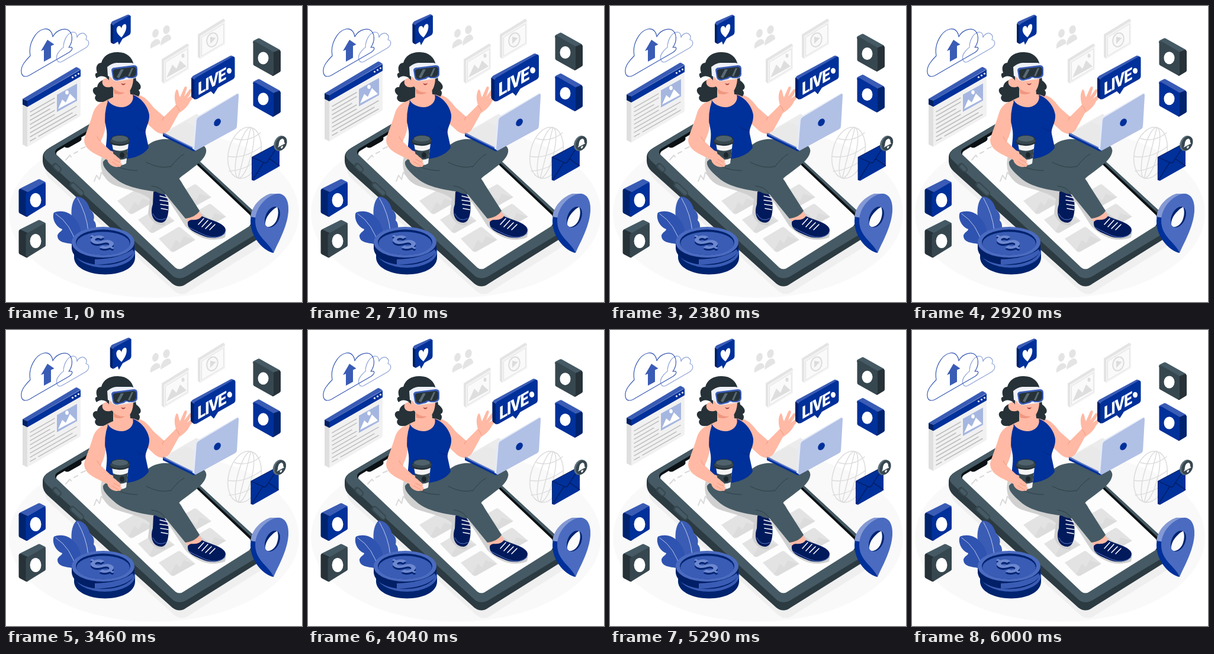
Recreate the animation shown at these times as an HTML page. Size 500x500 px, loop 6040 ms.

```html
<!DOCTYPE html>
<html lang="en">
<head>
<meta charset="utf-8">
<title>Live from the phone</title>
<style>
html, body { margin: 0; height: 100%; overflow: hidden; background: #fff; }
svg { display: block; width: 100vw; height: 100vh; }
.blue { --front: #00309a; --side: #00236f; --top: #3a5cb5; }
.dark { --front: #37474f; --side: #263238; --top: #455a64; }
.front { fill: var(--front); stroke: var(--front); }
.side { fill: var(--side); stroke: var(--side); }
.top { fill: var(--top); stroke: var(--top); }
.front, .side, .top { stroke-width: 6; stroke-linejoin: round; }
.line { fill: none; stroke-linecap: round; stroke-linejoin: round; }
.skin { fill: #ffb9a4; }
.ink { fill: #263238; }
.shoe { fill: #001a5c; }
</style>
</head>
<body>
<svg viewBox="0 0 500 500">
<defs>
  <!-- block facing left, and block facing right -->
  <g id="blockL">
    <path class="top" d="M420 61L427 57.500 460 76 451 80Z"/>
    <path class="side" d="M450 82L461 77.500V109L451 115Z"/>
    <path class="front" d="M420.500 63L449 79.500V114L420.500 98Z"/>
    <ellipse cx="434.500" cy="88" rx="9" ry="10.500" fill="#fff"/>
  </g>
  <g id="blockR">
    <path class="top" d="M25 311L56 295.500 64 299.500 35 315Z"/>
    <path class="side" d="M24.500 312L35 317V353L24.500 347.500Z"/>
    <path class="front" d="M36.500 318L64 302V335L36.500 352Z"/>
    <ellipse cx="50" cy="328" rx="9.500" ry="12" fill="#fff"/>
  </g>
  <g id="tile">
    <path d="M188 329L220 310Q223 308 226 311L250 331 214 351Q211 353 208 350Z" fill="#e3e3e3"/>
    <path d="M207 349L217 331 224 337 230 325 249 331 214 351Z" fill="#dcdcdc"/>
  </g>
  <g id="frame">
    <path d="M263 90L306 63.500 309 66V106L267 131 263 128Z" fill="#e4e4e4"/>
    <path d="M267 92.500L309 67V106L267 131Z" fill="#f3f3f3"/>
    <path d="M269.500 95L306.500 72.500V104.500L269.500 126.500Z" fill="#fafafa" stroke="#e3e3e3"/>
  </g>
  <path id="body" d="M62 262V255Q62 246 74 239L213 157 439 366Q443 381 428 392L305 469Q293 478 281 469L70 279Q62 271 62 262Z"/>
</defs>

<ellipse cx="250" cy="350" rx="245" ry="143" fill="#f9f9f9"/>

<!-- clouds -->
<g class="line" stroke-width="1.200">
  <path stroke="#8fa3d6" d="M91 95C84 94 84 84 89 78 92 74 95 71 97 70 97 58 104 45 113 44 118 44 120 48 120 53 123 46 130 44 134 48 137 51 136 55 135 57 141 58 142 66 134 71L96 93Q93 95 91 95Z"/>
  <path stroke="#3a5cb5" d="M33 119C24 119 24 106 30 97 34 91 38 87 41 84 37 64 50 42 64 39 73 37 78 44 79 52 84 42 96 37 104 40 113 45 114 59 106 70 113 68 114 73 107 78L43 115Q37 119 33 119Z"/>
</g>
<path d="M70 57L59 76 64 74V94L76 87.500V67.500L81.500 65Z" fill="#3a5cb5"/>

<!-- grey wall icons -->
<g fill="#e4e4e4">
  <ellipse cx="252.500" cy="46" rx="5.200" ry="7.500" transform="rotate(18 252 46)"/>
  <path d="M244 72C242 63 249 57 254 56Q260 55 261 63Z"/>
  <ellipse cx="271" cy="40" rx="5.500" ry="7.500" transform="rotate(18 271 40)"/>
  <path d="M261 67L262 59Q265 50 273 48 279 48 279 56Z"/>
</g>
<use href="#frame"/>
<path d="M271 121L281 99 288 106 294 92 305 102Z" fill="#dedede"/>
<ellipse cx="299" cy="84" rx="2.500" ry="3.500" fill="#dedede"/>
<use href="#frame" x="61" y="-42"/>
<ellipse cx="348.500" cy="57" rx="9" ry="12" transform="rotate(18 348 57)" fill="#f8f8f8" stroke="#dcdcdc" stroke-width="2"/>
<path d="M345 52L354.500 54 345 64Z" fill="#dcdcdc"/>

<!-- globe -->
<g class="line" stroke="#dcdcdc" stroke-width="1.500">
  <g transform="rotate(14 403 248)">
    <ellipse cx="403" cy="248" rx="27" ry="44"/>
    <ellipse cx="403" cy="248" rx="12" ry="44"/>
    <path d="M403 204V292"/>
  </g>
  <path d="M386 224Q409 231 430 214M375 254Q403 259 432 237M377 279Q399 278 420 264"/>
</g>

<!-- browser window -->
<g id="browser">
  <path d="M28 166L36 170V238L28 234Z" fill="#dfdfdf"/>
  <path d="M36 170L126 118.500V184Q126 186 124 187L36 238Z" fill="#f1f1f1"/>
  <path d="M28 157L117 104Q119 102.500 121 104L126 107 36 160Z" fill="#3a5cb5"/>
  <path d="M28 157L36 160V170.500L28 166.500Z" fill="#001f66"/>
  <path d="M36 160L126 107.500V119L36 170.500Z" fill="#00309a"/>
  <g fill="#fff"><circle cx="112.500" cy="120.500" r="1.600"/><circle cx="117.500" cy="117.500" r="1.600"/><circle cx="122.500" cy="114.500" r="1.600"/></g>
  <path d="M86 150L120 131V160L86 179Z" fill="#a5b6e0"/>
  <path d="M88 174L95 158 101 163 108 148 118 158Z" fill="#fff"/>
  <ellipse cx="103" cy="146" rx="2.800" ry="3.500" fill="#fff"/>
  <path class="line" stroke="#bdbdbd" stroke-width="1.500" d="M41 179L82 155.500M41 186L82 162.500M41 193L74 174M41 200L82 176.500M41 207L82 183.500M41 214L119 169.500M41 221L112 180.500M55 220L119 183.500M41 228L50 223"/>
</g>

<!-- phone -->
<use href="#body" fill="#efefef" x="4" y="13"/>
<use href="#body" fill="#2c3a41"/>
<path fill="#455a64" d="M64 252Q64 245 75 239L213 157 437 364Q441 375 428 382L304 457Q293 463 283 457L71 263Q64 257 64 252Z"/>
<path class="line" stroke="#37474f" stroke-width="10" d="M83 270L89 276M112 302L127 316"/>
<path class="line" stroke="#455a64" stroke-width="6" d="M84 271L89 276M113 303L127 316"/>
<path d="M84 250Q81 244 88 240L217 164 418 353Q424 361 414 370L300 442Q293 447 286 442Z" fill="#0b1114"/>
<path d="M85 251Q84 247 89 244L99 238Q103 241 108 238L124 229Q129 226 127 222L218 169.500 412 353Q418 364 411 372L300 442Q293 447 286 442Z" fill="#fdfdfd"/>
<g class="line" stroke="#dadada" stroke-width="2">
  <path d="M149 296L153 286 158 293 161 281 168 288"/>
  <path d="M101 260L108 252 110 255M115 249L121 246M127 241L134 238"/>
</g>
<use href="#tile"/>
<use href="#tile" x="35" y="32"/>
<use href="#tile" x="70" y="64"/>
<use href="#tile" x="97" y="-8"/>
<use href="#tile" x="122" y="25"/>
<path d="M277 208L322 182 345 200 300 225Z" fill="#ececec"/>
<path d="M163 250C155 275 165 298 190 305 212 312 232 316 243 326L240 350Q248 372 268 370L276 330 303 372Q335 404 370 391L372 380 330 350 295 300Z" fill="#d0d0d0"/>

<!-- leaves -->
<path d="M126 402C109 372 105 336 119 322 132 322 139 333 142 344 150 350 149 358 148 362 154 368 152 376 151 382Z" fill="#3a5cb5"/>
<path d="M112 402C102 400 86 400 87 387 90 381 95 380 95 377 83 373 77 357 81 349 92 344 108 347 117 360 128 371 128 391 128 405Z" fill="#2f53b0"/>
<path class="line" stroke="#dbe2f3" stroke-width=".8" d="M84 351Q110 368 119 404M121 325Q136 351 139 380"/>

<!-- coins -->
<path d="M115 410V426C119 462 215 463 218 426V410Z" fill="#00236f"/>
<ellipse cx="167" cy="415" rx="51" ry="27" fill="#3a5cb5"/>
<path d="M111 400V410C115 447 213 446 217 410V400Z" fill="#001f66"/>
<path d="M150 437V428Q192 427 214 411L216 416Q202 436 150 437Z" fill="#3a5cb5"/>
<ellipse cx="164" cy="399" rx="53" ry="26" fill="#4a6bc0"/>
<ellipse cx="164" cy="399" rx="46" ry="21.500" fill="#00236f"/>
<ellipse cx="164" cy="401" rx="45" ry="19.500" fill="#3a5cb5"/>
<g font-family="Roboto, Arial, sans-serif" font-size="48" font-weight="700" text-anchor="middle">
  <text transform="matrix(.85 -.49 .85 .49 162 402)" y="17" fill="#00236f">$</text>
  <text transform="matrix(.85 -.49 .85 .49 162 399)" y="17" fill="#6d88d0">$</text>
</g>

<!-- far leg and shoe -->
<path class="shoe" d="M249 314C258 308 272 317 274 332 276 347 273 365 263 366 247 366 243 349 248 335Z"/>
<path class="line" stroke="#fff" stroke-width="1.500" d="M260 321L272 324M260 328L274 330M261 335L274 337M262 342L273 344"/>
<path class="line" stroke="#5b78c4" d="M248 351Q255 366 270 359"/>
<path d="M228 248C246 220 275 222 296 230 325 226 341 236 338 247 335 262 314 274 294 290L272 318Q260 319 251 312L274 278Z" fill="#455a64"/>

<!-- right arm and hand -->
<path class="skin" d="M217 149C235 150 243 164 250 172L267 187 287 167C284 157 284 148 288 141 292 140 291 150 294 154L301 138C304 134 307 137 305 141L301 153 310 141C315 139 314 145 309 152L305 157 313 151C318 152 316 156 311 161 306 172 299 176 292 181L276 210Q265 221 252 211L229 190Z"/>
<path class="line" stroke="#ef9780" d="M287 168Q291 171 293 177M267 187L264 193"/>

<!-- laptop -->
<path d="M268 215L303 196 321 204 318 241Z" fill="#e9e9e9"/>
<path d="M265 215L318 241 388 201V206L319 245Q317 246 314 244L265 220Z" fill="#00309a"/>
<path d="M265 215L318 241" stroke="#5c7acb" stroke-width="2"/>
<path d="M315 241L319 192Q319 189 322 187L389 148Q393 146 393 150L390 203Q390 206 387 208L320 244Z" fill="#e6ebf7"/>
<path d="M318 242L322 193Q322 190 325 188L390 149Q393 147 393 151L390 203Q390 206 387 208L321 244Q318 245 318 242Z" fill="#b1c0e5"/>
<ellipse cx="357.500" cy="196.500" rx="5" ry="7" transform="rotate(38 357 196)" fill="#00309a"/>

<!-- near leg and shoe -->
<path class="skin" d="M300 347L325 344 332 357 309 372Z"/>
<path fill="#455a64" d="M164 263C175 249 212 247 237 236 265 249 266 265 275 275 284 283 293 290 299 302L327 346C322 354 312 358 303 359L268 316C246 312 205 310 183 290 168 277 163 270 164 263Z"/>
<path class="line" stroke="#2f3f47" d="M237 264Q260 276 278 271M190 272Q205 278 222 278M268 316Q262 306 246 304M278 272Q291 255 301 250"/>
<path class="shoe" d="M307 365C312 357 323 366 331 355 342 361 370 366 371 378 370 393 346 395 330 387 316 381 306 377 307 365Z"/>
<path class="line" stroke="#fff" stroke-width="1.600" d="M325 369L334 359M331 373L341 362M337 376L347 366M344 378L353 369"/>
<path class="line" stroke="#5b78c4" d="M309 374Q326 383 338 388 358 395 370 384"/>

<!-- hair, torso, head -->
<path class="ink" d="M171 122C163 117 158 118 153 122 149 116 151 113 154 113 150 102 155 96 161 96 164 84 175 78 187 78 203 77 213 86 216 99L220 126C230 133 229 140 224 142 230 149 222 158 212 155 202 162 188 158 183 151 182 163 169 166 162 162 153 164 147 156 152 151 143 144 147 136 154 137 155 128 163 125 171 122Z"/>
<path class="skin" d="M181 138L209 138 210 149Q224 150 232 160L214 180 181 177 160 165Q175 156 181 154Z"/>
<path d="M172 159C175 165 184 171 196 171 210 170 217 159 214 150 229 155 240 170 242 184 243 198 234 206 236 216L241 239C231 256 197 265 169 253 167 235 173 221 169 205 166 190 165 172 172 159Z" fill="#00309a"/>
<path class="line" stroke="#002777" stroke-width=".8" d="M235 211Q227 210 221 205"/>
<path class="skin" d="M174 107Q190 93 214 107C217 123 214 139 208 144 198 149 185 144 179 136 168 140 161 134 163 126 166 120 173 122 174 126Z"/>
<path d="M181 139Q190 147 201 146 194 151 183 148Z" fill="#ef9780"/>
<path d="M194 130Q198 133 202 130 200 135 196 133Z" fill="#a43c3c"/>
<path d="M171 103Q178 97 186 96L212 96Q221 97 222 104V117Q221 122 214 123L187 127Q179 126 178 121L172 118Z" fill="#eef1f8"/>
<path d="M178 108Q179 104 184 104L216 100Q222 100 222 106V116Q221 121 214 122L207 122Q203 119 200 123L188 126Q181 126 180 120Z" fill="#3a5cb5"/>
<path class="ink" d="M180.500 110Q181 107 186 106.500L215 103Q220 103 220 107V114Q219 119 213 120L206 120Q202 117 198 121L189 123.500Q183 124 182 119Z"/>
<path d="M187 120L194 107H199L191 122ZM206 118L212 105H215L209 119Z" fill="#596b75"/>

<!-- cup and left arm -->
<path class="skin" d="M172 161C161 160 150 168 146 184 141 201 134 216 132 226 132 237 140 244 151 250L173 261Q179 271 193 272L197 263 194 251 176 244 160 229Q167 214 168 204 165 181 172 161Z"/>
<path class="line" stroke="#ef9780" d="M160 229Q156 226 154 221"/>
<path d="M179 232H207L203 266Q194 272 185 267Z" fill="#f4f4f4"/>
<path d="M180 242Q193 248 206 241L204 257Q194 262 183 258Z" fill="#37474f"/>
<ellipse cx="196" cy="252" rx="4" ry="5" fill="#1c272c"/>
<path class="ink" d="M176 227L178 222Q192 214 207 222L209 228V232Q193 240 176 233Z"/>
<ellipse cx="192.500" cy="227.500" rx="16" ry="6" fill="#37474f"/>
<ellipse cx="192.500" cy="224" rx="13.500" ry="5" fill="#4f626c"/>
<path class="skin" d="M169 250C177 247 183 249 188 255 193 258 196 262 193 264 198 267 195 271 191 271 185 274 176 270 172 263Z"/>
<path class="line" stroke="#ef9780" d="M182 259L192 264M179 263L190 270"/>

<!-- pin -->
<path d="M452 417C437 415 413 392 413 364 413 341 430 322 448 317L461 317 455 360Z" fill="#00309a"/>
<path d="M413 356C415 338 430 322 447 317L462 317 425 358Z" fill="#8499d4"/>
<path d="M452 417C445 399 421 390 421 363 421 338 444 317 461 317 474 318 478 333 477 347 475 373 461 397 452 417Z" fill="#4a6bc0"/>
<ellipse cx="450" cy="356.500" rx="11.500" ry="18.500" transform="rotate(24 450 356.500)" fill="#00236f"/>
<path d="M458 339.500C449 344 437 357 438 369 440 376 450 374 456 364 460 356 461 346 458 339.500Z" fill="#fbfbfb"/>

<!-- social blocks -->
<use href="#blockR" class="blue"/>
<use href="#blockR" class="dark" y="69"/>
<g id="blocks">
  <use href="#blockL" class="dark"/>
  <use href="#blockL" class="blue" y="69"/>
</g>

<!-- heart bubble -->
<g id="heart">
  <path d="M177 31Q177 28 180 26L205 15Q207 14 209 16L211 18 183 33 182 64 178 62Q177 61 177 59Z" fill="#3a5cb5"/>
  <path d="M177 30L182 33V64L178 62Q177 61 177 59Z" fill="#001f66"/>
  <path d="M181 35Q181 32 184 30L207 17Q210.500 15 210.500 19V44Q210.500 47 208 49L197 55 191 65.500 189 60 184 63Q181 65 181 61Z" fill="#00309a"/>
  <path d="M195 53C189 48 186 44 187 38 189 32 194 33 195 38 196 31 202 28 203 33 204 40 200 47 195 53Z" fill="#fff"/>
</g>

<!-- live bubble -->
<g id="live">
  <path d="M313 123Q313 120 316 118L379 84Q382 83 386 87L320 125 320 158 315 155Q313 154 313 151Z" fill="#3a5cb5"/>
  <path d="M313 121L319 125V158L315 155Q313 154 313 151Z" fill="#001f66"/>
  <path d="M318 127Q318 123 321 121L382 86Q386.500 84 386.500 89V118Q386.500 122 383 124L358 138 351 149 346 144 323 157Q318 159 318 154Z" fill="#00309a"/>
  <text transform="matrix(.866 -.5 0 1 324 151)" font-family="Roboto, Arial, sans-serif" font-size="29" font-weight="900" letter-spacing="-1.500" fill="#fff">LIVE</text>
  <ellipse cx="377" cy="109.500" rx="4" ry="4.800" fill="#fff"/>
</g>

<!-- envelope -->
<g id="mail">
  <path d="M415 255L460 231 462 232V270L419 295 415 294Z" fill="#001f66"/>
  <path d="M416 255.500L462 231.500V269Q462 271 460 272L419 295 416 294Z" fill="#00309a"/>
  <path class="line" stroke="#001b5c" stroke-width="1.300" d="M417 256L437 265Q441 266 443 261L462 232M417 293L435 265M445 258L462 270"/>
  <ellipse cx="463" cy="232" rx="10" ry="13.500" transform="rotate(25 463 232)" fill="#5d707a"/>
  <ellipse cx="465" cy="232" rx="9" ry="12.500" transform="rotate(25 465 232)" fill="#37474f"/>
  <path d="M459 239Q461 236 461 232 462 225 467 224 470 225 470 229 470 232 472 232ZM464 238L468 236Q468 240 465 241Z" fill="#fff"/>
</g>
</svg>

<script>
const LOOP = 6040, LEAD = 30;
const beatKeys = [[0, 1], [.1, 1.1], [.3, 1], [.4, 1], [.5, 1.1], [.6, 1], [1, 1]];
const floatKeys = [[0, 0], [.5, -10], [1, 0]];
const shakeKeys = [0, -1, 2, -4, 4, -4, 4, -4, 2, -1, 0].map((x, i) => [i / 10, x]);

// Linear keyframes, repeated every `period` ms
function track(keys, time, period) {
  const p = ((time % period + period) % period) / period;
  const i = keys.findIndex(k => k[0] > p);
  const [a, from] = keys[i - 1], [b, to] = keys[i];
  return from + (to - from) * (p - a) / (b - a);
}

const move = (id, value) => document.getElementById(id).setAttribute("transform", value);
const zoom = (id, x, y, s) => move(id, `translate(${x} ${y}) scale(${s}) translate(${-x} ${-y})`);

function draw(now) {
  const t = now % LOOP + LEAD;
  const lift = `translate(0 ${track(floatKeys, t, 1500) + .4})`;
  move("browser", lift);
  move("blocks", lift);
  move("mail", `translate(${track(shakeKeys, t, 1500) + .2} 0)`);
  zoom("heart", 194, 40, track(beatKeys, t, 3000));
  zoom("live", 350, 121, track(beatKeys, t - 410, 3000));
  requestAnimationFrame(draw);
}
draw(performance.now());
</script>
</body>
</html>
```
